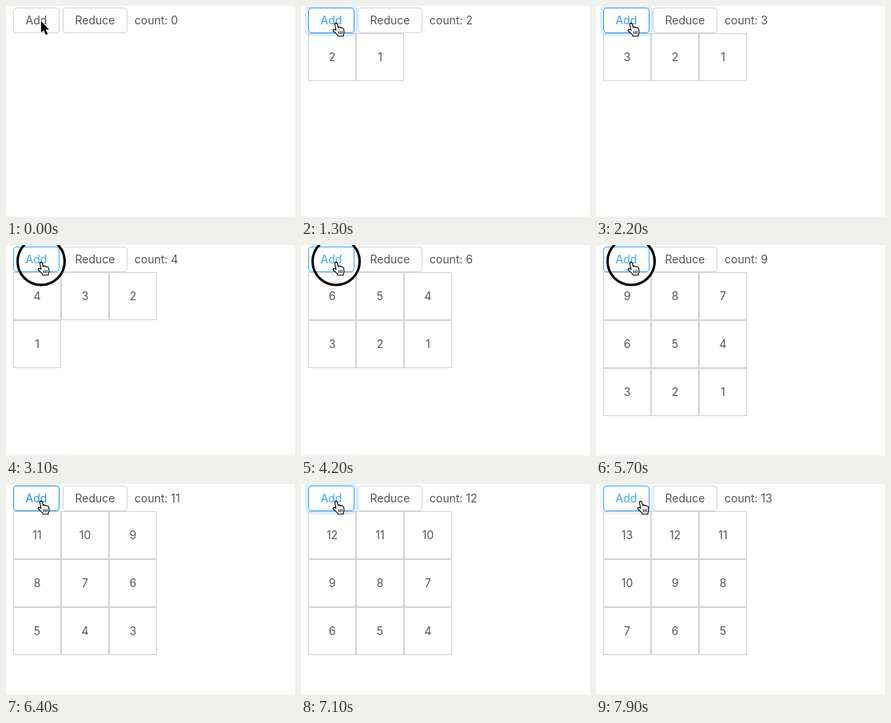
Recreate the animation shown at these times as an HTML page. Size 362x264 px, loop 8 s.

```html
<!DOCTYPE html>
<html lang="en">
<head>
<meta charset="utf-8">
<title>Counter list</title>
<style>
  html, body { margin: 0; width: 100%; height: 100%; overflow: hidden; background: #fff; }
  svg { display: block; font: 14px Inter, "Liberation Sans", sans-serif; }
  text { fill: #555; }
  rect { fill: #fff; stroke: #d4d4d4; }
  .mid { text-anchor: middle; }
</style>
</head>
<body>
<svg width="362" height="264" viewBox="0 0 362 264">
  <path d="M0 263.5H362" stroke="#f8f8f8"/>
  <g id="cells"></g>
  <rect id="glow" x="7" y="0" width="62" height="36" rx="6" style="fill:none;stroke:#1890ff;stroke-width:4"/>
  <rect id="add" x="9.5" y="2.5" width="57" height="31" rx="3.5"/>
  <text id="addText" class="mid" x="38" y="23">Add</text>
  <rect x="71.5" y="2.5" width="80" height="31" rx="3.5"/>
  <text class="mid" x="111.5" y="23">Reduce</text>
  <text id="count" x="161" y="23"></text>
  <circle id="ring" cx="44" cy="20.5" r="29.5" fill="none" stroke="#000" stroke-width="3"/>
  <path id="arrow" d="M44 19V33.2L47.2 30.2 49.8 36 52.2 35 49.7 29.4H54Z" stroke="#fff" stroke-width="1.4" paint-order="stroke"/>
  <g id="hand" fill="#fff" stroke="#000" stroke-width="1.1" stroke-linejoin="round" stroke-linecap="round">
    <path d="M4.6 9.6L3.2 2.7Q3 .8 4.5 .6 5.8 .6 6.2 2L7.3 6.2Q8 5 9.3 5.4 10 5.6 10.3 6.4 11.6 5.7 12.5 7 14 6.8 14.3 8.4L14.6 12Q14.6 13.5 13.7 15.2V17H7Q6.6 15.3 4.6 13.6L1.3 10.7Q.4 9.2 1.6 8.6 3 8.2 4.6 9.6Z"/>
    <path d="M8 11.2V14.2M10 11V14M12 10.8V13.8" stroke-width=".9"/>
  </g>
</svg>
<script>
const LOOP = 8000, HOVER = 500, RELEASE = 200, GLOW = 300, FADE = 600;
const presses = [600, 1000, 1900, 2400, 3100, 3600, 4200, 4700, 5200, 5700, 6200, 6700, 7200];
const blues = ['#40a9ff', '#1f86e6', '#2490ea', '#369ff5'];
const $ = id => document.getElementById(id);
const show = (id, on) => $(id).style.display = on ? '' : 'none';
let shown = -1;

// Newest number first, three per row, nine at most.
function drawList(n) {
  if (n === shown) return;
  shown = n;
  $('count').textContent = 'count: ' + n;
  $('cells').innerHTML = Array.from({ length: Math.min(n, 9) }, (_, i) => {
    const x = 9 + i % 3 * 60, y = 34 + Math.floor(i / 3) * 60;
    return `<rect x="${x + .5}" y="${y + .5}" width="59" height="59"/>` +
      `<text class="mid" x="${x + 30}" y="${y + 35}">${n - i}</text>`;
  }).join('');
}

function draw(t) {
  const last = presses.filter(p => p <= t).pop();
  const age = last === undefined ? Infinity : t - last;
  const hover = t >= HOVER;
  const blue = age < 400 ? blues[Math.floor(age / 100)] : '#40a9ff';

  drawList(presses.filter(p => p + RELEASE <= t).length);
  $('add').style.stroke = hover ? blue : '';
  $('addText').style.fill = hover ? blue : '';
  show('glow', age >= GLOW && age < Infinity);
  $('glow').style.opacity = age < FADE ? .15 : .08;
  show('ring', age < RELEASE);
  show('arrow', !hover);
  show('hand', hover);
  $('hand').setAttribute('transform', `translate(${t < 7900 ? 39.3 : 51.3} 20.8)`);
}

const start = performance.now();
function tick() {
  draw((performance.now() - start) % LOOP);
  requestAnimationFrame(tick);
}
tick();
</script>
</body>
</html>
```
